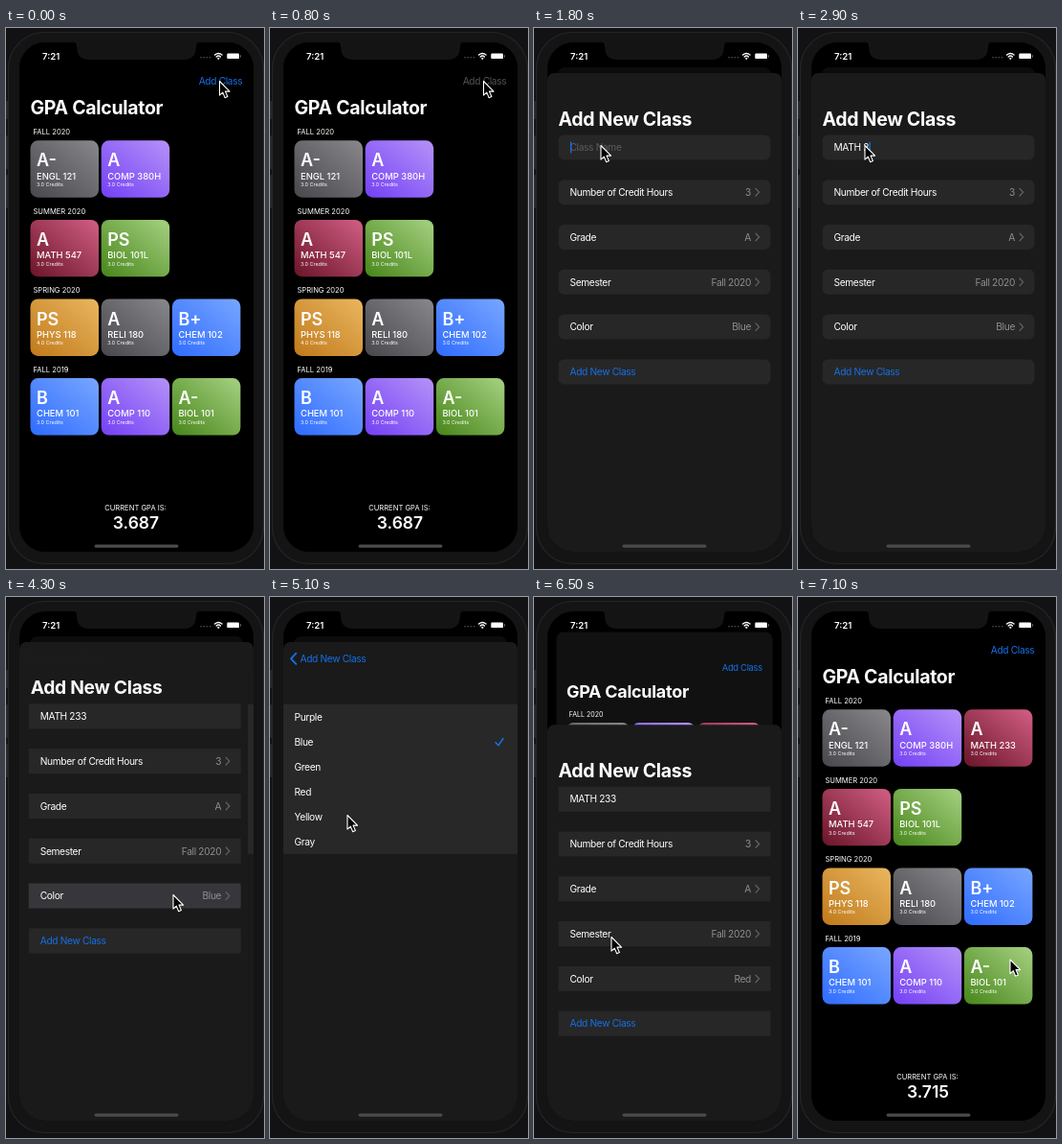
Recreate the animation shown at these times as an HTML page. Size 270x564 px, loop 7.2 s.

```html
<!DOCTYPE html>
<html lang="en">
<head>
<meta charset="utf-8">
<title>GPA Calculator</title>
<style>
html, body { margin: 0; height: 100%; overflow: hidden; background: #121215; }
svg { display: block; width: 100vw; height: 100vh; font-family: Inter, Roboto, sans-serif; }
text { white-space: pre; fill: #fff; }
.title { letter-spacing: -.3px; font-weight: 700; }
.body { letter-spacing: -.35px; }
text.link { fill: #1670e6; }
text.value { fill: #8e8e93; }
</style>
</head>
<body>
<svg id="stage" viewBox="0 0 270 564"></svg>
<script>
const LOOP = 7200, BLUE = '#1670e6', SHEET = '#1a1a1a', ROW = '#272727', LIT = '#37373b';

const rect = (x, y, w, h, fill, r = 0, more = '') =>
  `<rect x="${x}" y="${y}" width="${w}" height="${h}" rx="${r}" fill="${fill}" ${more}/>`;
// y is the middle of the capitals
const text = (x, y, size, str, more = '') =>
  `<text x="${x}" y="${y + size * .364}" font-size="${size}" ${more}>${str}</text>`;
const line = (d, color, width, more = '') =>
  `<path d="${d}" fill="none" stroke="${color}" stroke-width="${width}" stroke-linecap="round" stroke-linejoin="round" ${more}/>`;

const tones = {
  gray: ['#48484c', '#88888c'], purple: ['#7340f5', '#b592f8'], red: ['#6a1428', '#d25f85'],
  green: ['#478619', '#a6d182'], yellow: ['#c07a1a', '#eab660'], blue: ['#2f6cff', '#78a6ff']
};
const terms = [
  ['FALL 2020', 'A-|ENGL 121|gray', 'A|COMP 380H|purple', 'A|MATH 233|red'],
  ['SUMMER 2020', 'A|MATH 547|red', 'PS|BIOL 101L|green'],
  ['SPRING 2020', 'PS|PHYS 118|yellow', 'A|RELI 180|gray', 'B+|CHEM 102|blue'],
  ['FALL 2019', 'B|CHEM 101|blue', 'A|COMP 110|purple', 'A-|BIOL 101|green']
];
const fields = [['Number of Credit Hours', '3'], ['Grade', 'A'], ['Semester', 'Fall 2020'], ['Color', 'Blue']];
const colors = ['Purple', 'Blue', 'Green', 'Red', 'Yellow', 'Gray'];

function card(info, col, row) {
  const [grade, name, tone] = info.split('|');
  const x = 25.5 + col * 74.2, y = 117.3 + row * 82.6;
  return `<g ${name == 'MATH 233' ? 'id="added"' : ''}>` +
    rect(x, y, 71.5, 59.4, `url(#${tone})`, 8) +
    text(x + 6.5, y + 20.5, 18, grade, 'font-weight="600"') +
    text(x + 6.5, y + 36.8, 9.4, name, 'font-weight="500"') +
    text(x + 6.5, y + 45.7, 5.4, `${name == 'PHYS 118' ? 4 : 3}.0 Credits`) + '</g>';
}

const home = rect(14, 15, 245, 540, '#000', 8, 'id="paper"') +
  text(247.3, 55.2, 10.2, 'Add Class', 'id="add" class="body link" text-anchor="end"') +
  text(25.5, 82.5, 19.5, 'GPA Calculator', 'class="title"') +
  terms.map(([term, ...cards], row) =>
    text(28.5, 108.2 + row * 82.7, 7.6, term) + cards.map((c, col) => card(c, col, row)).join('')).join('') +
  text(135.5, 500.2, 7.6, 'CURRENT GPA IS:', 'text-anchor="middle"') +
  text(136, 516, 17.5, '', 'id="gpa" text-anchor="middle" font-weight="600"') +
  rect(14, 15, 245, 540, '#000', 8, 'id="dim"');

const rowY = i => 124.4 + i * 46.8;
const box = (i, id = '') => rect(25.5, rowY(i) - 13, 222, 26, ROW, 6, `class="box" ${id}`);
const form = box(0) +
  text(37.5, rowY(0), 10.2, '', 'id="name" class="body"') +
  rect(38, 118.5, 1.3, 12, BLUE, .6, 'id="caret"') +
  fields.map(([label, value], i) => {
    const y = rowY(i + 1), last = label == 'Color';
    return box(i + 1, last ? 'id="colorRow"' : '') +
      text(37.5, y, 10.2, label, 'class="body"') +
      text(227, y, 10.2, value, `class="body value" text-anchor="end" ${last ? 'id="colorValue"' : ''}`) +
      line(`M232 ${y - 3.8}l3.6 3.8l-3.6 3.8`, '#65656a', 1.2);
  }).join('') +
  box(5) + text(37.5, rowY(5), 10.2, 'Add New Class', 'class="body link"');

const picker = rect(14, 75, 245, 480, SHEET) + rect(14, 111.8, 245, 156, '#282828') +
  rect(14, 189.8, 245, 26, LIT, 0, 'id="redRow"') +
  colors.map((c, i) => text(25.5, 125 + i * 26, 10.2, c, 'class="body"')).join('') +
  line('M236 151.5l3 3.3l5-7.3', BLUE, 1.5, 'id="check"');

const sheet = rect(14, 47, 245, 520, SHEET, 7) +
  `<g id="form">${form}</g><g id="picker">${picker}</g>` +
  `<g id="title">${text(0, 0, 19.5, 'Add New Class', 'class="title"')}</g>` +
  `<g id="back">${line('M27.3 58.7l-5.3 5.6l5.3 5.6', BLUE, 1.8)}${text(31.5, 64.3, 10.2, 'Add New Class', 'class="body link"')}</g>`;

const gradients = Object.entries(tones).map(([id, [dark, light]]) =>
  `<linearGradient id="${id}" x1="0" y1="1" x2="1" y2="0"><stop stop-color="${dark}"/><stop offset="1" stop-color="${light}"/></linearGradient>`).join('');

stage.innerHTML = `<defs>${gradients}<clipPath id="screen">${rect(14, 15, 245, 531, '#000', 27)}</clipPath></defs>` +
  rect(0, 0, 270, 564, '#121215') +
  [[76, 19], [112, 35], [153, 35]].map(([y, h]) => rect(0, y, 3, h, '#29292c', 1)).join('') +
  rect(2.5, 4.5, 267, 554, '#141414', 38, 'stroke="#252527" stroke-width="1.2"') +
  `<g clip-path="url(#screen)">${rect(14, 15, 245, 531, '#000')}<g id="home">${home}</g><g id="sheet">${sheet}</g></g>` +
  `<path d="M70 14q4 1 4 5q0 14 13 14h99q13 0 13-14q0-4 4-5z" fill="#141414"/>` +
  text(38, 29.3, 9.6, '7:21', 'font-weight="600"') +
  [204, 207.2, 210.4, 213.6].map(x => `<circle cx="${x}" cy="30.7" r=".8" fill="#55555a"/>`).join('') +
  line('M218.6 28q3.7-3.2 7.4 0M220.2 30q2.1-1.8 4.2 0', '#fff', 1.4) +
  '<circle cx="222.3" cy="31.8" r="1.1" fill="#fff"/>' +
  rect(231.3, 26.5, 12.7, 5.6, '#fff', 1.2) + rect(245, 28, .8, 2.6, '#999', .4) +
  rect(92.5, 538.5, 88, 3.2, '#4b4b4d', 1.6) +
  '<path id="cursor" d="M0 0V14.6L3.3 11.6L5.7 17.2L8.4 16L6 10.6H10.6Z" fill="#000" stroke="#fff" stroke-width="1.1" stroke-linejoin="round"/>';

const $ = id => document.getElementById(id);
const set = (id, attrs) => { for (const k in attrs) $(id).setAttribute(k, attrs[k]); };
const boxes = document.querySelectorAll('.box');

// critically damped spring, ms since its start
const spring = ms => { const x = Math.max(0, ms) * .017; return 1 - (1 + x) * Math.exp(-x); };

// time, x, y of the pointer's stops
const stops = [[0, 223.5, 55.5], [1050, 223.5, 55.5], [1600, 70, 122.5], [3350, 70, 122.5], [3950, 175, 310.5],
  [4400, 175, 310.5], [5100, 81, 227.5], [5300, 81, 206], [5600, 81, 206], [6250, 81, 354.5],
  [6520, 81, 354.5], [7050, 222, 378], [LOOP, 222, 378]];
function pointer(t) {
  const i = stops.findIndex(s => s[0] > t), [t0, x0, y0] = stops[i - 1], [t1, x1, y1] = stops[i];
  const u = (t - t0) / (t1 - t0), e = u * u * (3 - 2 * u);
  return [x0 + (x1 - x0) * e, y0 + (y1 - y0) * e];
}

const keys = [2300, 2400, 2500, 2600, 2700, 2850, 3100, 3250];

function draw(t) {
  const up = spring(t - 805) - spring(t - 6457);
  const push = spring(t - 4287) - spring(t - 5480);
  const saved = t >= 6400, picked = t >= 5400;

  const s = 1 - .092 * up, shade = Math.round(20 * up);
  set('home', { transform: `translate(${136.5 * (1 - s)} ${27.4 * up}) scale(${s})` });
  set('paper', { fill: `rgb(${shade},${shade},${shade})` });
  set('dim', { opacity: saved ? 0 : .4 * up });
  $('add').style.fill = t > 800 && !saved ? '#555' : BLUE;
  set('add', { opacity: t >= 700 && t <= 800 ? .5 : 1 });
  set('added', { visibility: saved ? 'visible' : 'hidden' });
  $('gpa').textContent = saved ? '3.715' : '3.687';

  set('sheet', { transform: `translate(0 ${500 * (1 - up)})` });
  set('form', { transform: `translate(${-73.5 * push} 0)` });
  set('picker', { transform: `translate(${245 * (1 - push)} 0)`, visibility: push > .001 ? 'visible' : 'hidden' });
  set('title', { transform: `translate(${25.5 + 6 * push} ${95 - 30.7 * push}) scale(${1 - .5 * push})`, opacity: 1 - push });
  set('back', { opacity: push });

  const typed = 'MATH 233'.slice(0, keys.filter(k => k <= t).length);
  $('name').textContent = typed || 'Class Name';
  $('name').style.fill = typed ? '#fff' : '#5c5c60';
  const typing = t > 2250 && t < 3600;
  set('caret', {
    x: 38 + (typed ? $('name').getComputedTextLength() : 0),
    opacity: t > 1650 && t < 4150 && (typing || t % 1000 > 500) ? 1 : 0
  });
  for (const b of boxes) b.setAttribute('rx', t < 4200 ? 6 : 0);
  set('colorRow', { fill: t >= 4200 && t < 5700 ? LIT : ROW });
  $('colorValue').textContent = picked ? 'Red' : 'Blue';
  set('redRow', { opacity: picked ? 1 : 0 });
  set('check', { transform: `translate(0 ${picked ? 52 : 0})` });

  set('cursor', { transform: `translate(${pointer(t)})` });
}

function tick() {
  draw(performance.now() % LOOP);
  requestAnimationFrame(tick);
}
tick();
</script>
</body>
</html>
```
